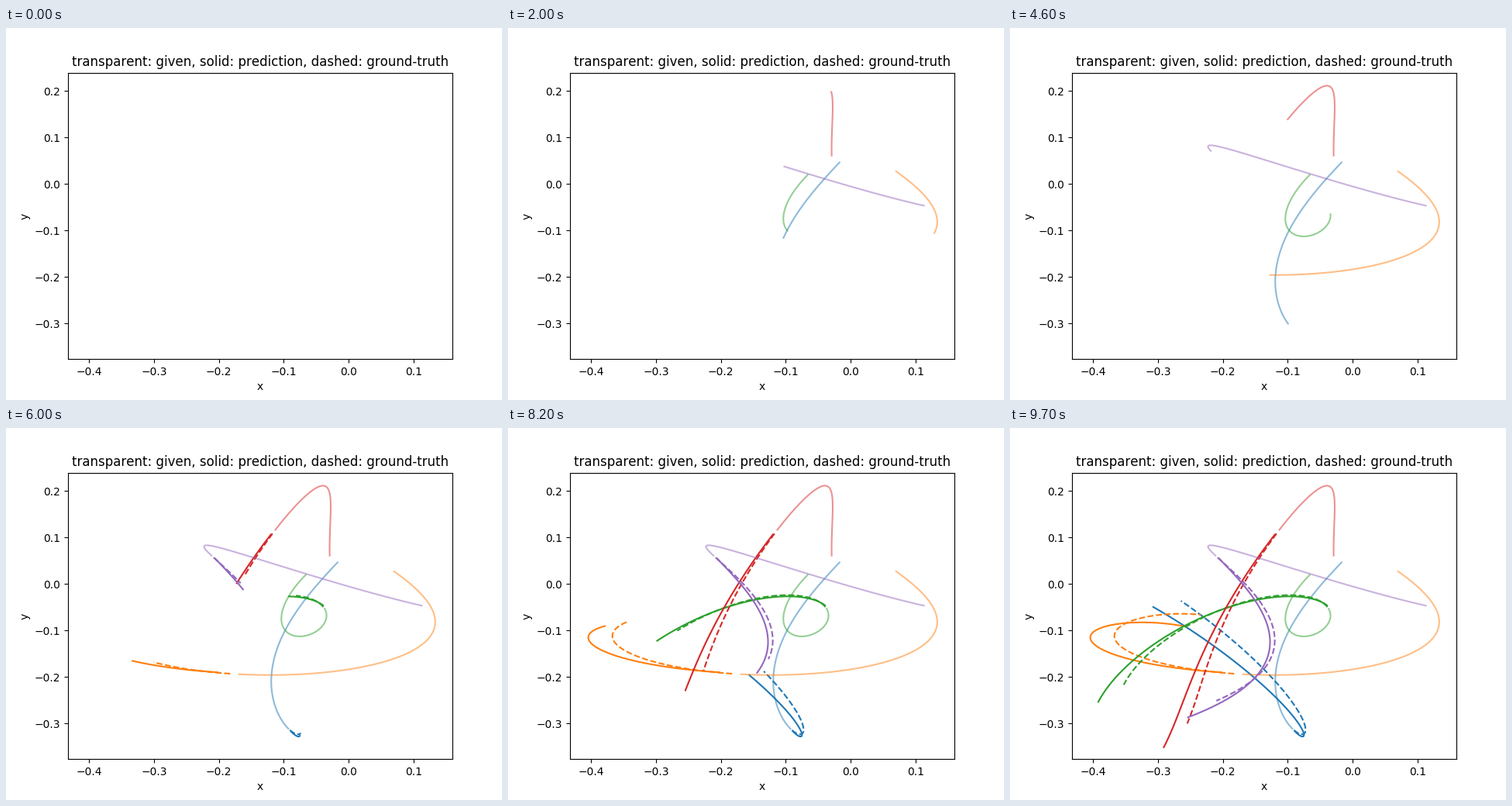
Recreate the animation shown at these times as a matplotlib script. Size 640 by 480 pixels, loop 9800 ms.

```python
import numpy as np
import matplotlib.pyplot as plt
from matplotlib.animation import FuncAnimation

plt.rcParams["text.kerning_factor"] = 6

FRAMES = 98
GIVEN_STEPS = 49
XLIM = (-0.4323, 0.1597)
YLIM = (-0.3762, 0.2398)

# Five equal masses, some of them joined by equal springs.
BODIES = ["blue", "orange", "green", "red", "purple"]
SPRINGS = ["blue-orange", "blue-green", "orange-green", "orange-purple",
           "green-red", "green-purple", "red-purple"]
STIFFNESS = 0.001

# Observed stage positions (x, y) in pixels, one per body, keyed by time step.
TRUTH = {
    0: [(427.7, 173.4), (500.8, 185.3), (387.4, 189.5), (417.3, 164.2), (536.4, 228.9)],
    19: [(355.8, 271), (550.2, 264.6), (361.1, 261.6), (417.2, 82.5), (356.6, 178.7)],
    45: [(358.2, 381.6), (335.6, 319), (413, 240), (358, 117.6), (258.2, 158.6)],
    96: [(221, 223.5), (247, 241), (146, 331), (229, 381), (266, 352)],
}
PREDICTION = {
    49: [(366.5, 391), (277, 316), (409.5, 230), (343, 136), (268, 168)],
    74: [(349.8, 354.9), (103, 266.7), (248, 244.4), (245.2, 298.6), (334, 282.6)],
    96: [(183.5, 230.4), (230.6, 257), (114.4, 354.6), (199.7, 410.4), (227.6, 372.8)],
}


def spring_modes():
    """Natural frequencies and mode shapes of the spring network."""
    laplacian = np.zeros((len(BODIES), len(BODIES)))
    for spring in SPRINGS:
        i, j = (BODIES.index(name) for name in spring.split("-"))
        laplacian[[i, j], [i, j]] += 1
        laplacian[[i, j], [j, i]] -= 1
    values, shapes = np.linalg.eigh(STIFFNESS * laplacian)
    return np.sqrt(np.clip(values, 0, None)), shapes.T


def oscillation(omega, t):
    """Unit responses to a start offset and a start speed; a drift if omega is 0."""
    return np.column_stack([np.cos(omega * t), t * np.sinc(omega * t / np.pi)])


def simulate(keys, steps):
    """Spring motion that best passes the keys, as (step, body, axis)."""
    times, points = np.array(list(keys)), np.array(list(keys.values()))
    path = np.zeros((len(steps), len(BODIES), 2))
    for omega, shape in zip(*spring_modes()):
        response = oscillation(omega, times)
        start = np.linalg.lstsq(response, shape @ points, rcond=None)[0]
        path += (oscillation(omega, steps) @ start)[:, None] * shape[:, None]
    return path


def to_data(p):
    x = XLIM[0] + (p[:, 0] - 80) / 496 * (XLIM[1] - XLIM[0])
    y = YLIM[1] - (p[:, 1] - 57.6) / 369.6 * (YLIM[1] - YLIM[0])
    return x, y


fig, ax = plt.subplots(figsize=(6.4, 4.8), dpi=100)
ax.set_xlim(*XLIM)
ax.set_ylim(*YLIM)
ax.set_xlabel("x")
ax.set_ylabel("y")
ax.set_title("transparent: given, solid: prediction, dashed: ground-truth")

steps = np.arange(FRAMES - 1)
truth = simulate(TRUTH, steps)
predicted = simulate(PREDICTION, steps[GIVEN_STEPS:])
tracks = []


def add_track(path, start, body, **style):
    line, = ax.plot([], [], color="tab:" + BODIES[body], **style)
    tracks.append((line, *to_data(path[:, body]), start))


for body in range(len(BODIES)):
    add_track(truth[:GIVEN_STEPS], 0, body, alpha=0.5)
    add_track(predicted, GIVEN_STEPS, body)
    add_track(truth[GIVEN_STEPS:], GIVEN_STEPS, body, linestyle="--")


def update(frame):
    for line, x, y, start in tracks:
        count = max(frame - start, 0)
        line.set_data(x[:count], y[:count])
    return [track[0] for track in tracks]


anim = FuncAnimation(fig, update, frames=FRAMES, interval=100, repeat=True, repeat_delay=0)
plt.show()
```
